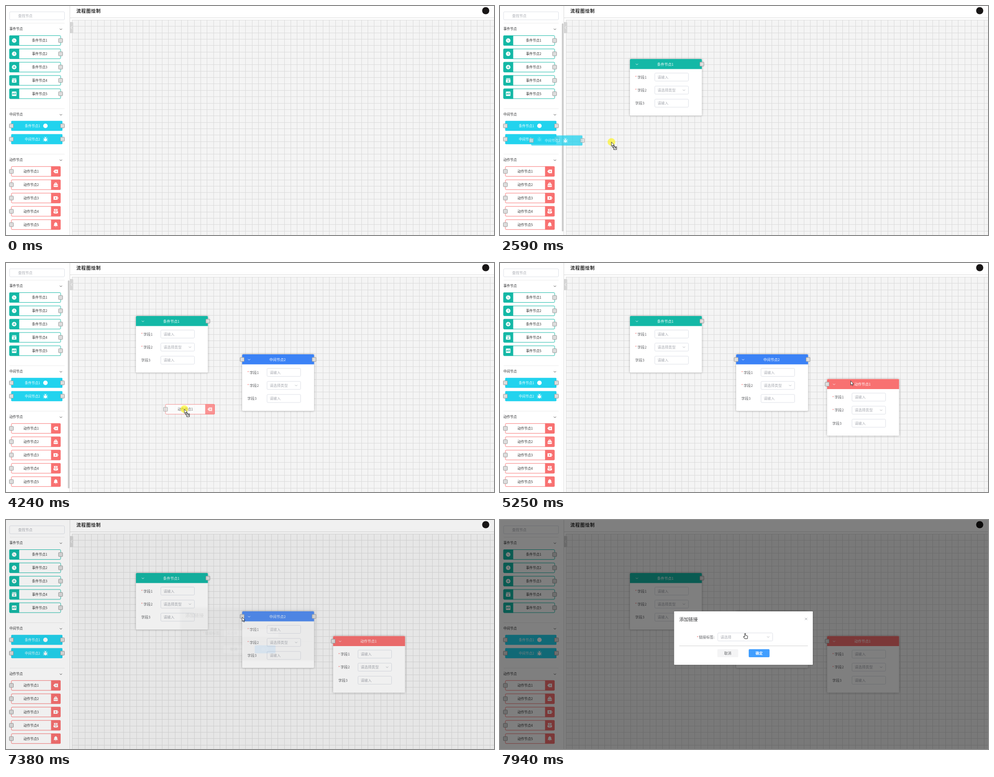
An HTML page with a canvas for the animation above (8000 ms loop, 1089x514 px).

```html
<!DOCTYPE html>
<html lang="zh">
<head>
<meta charset="utf-8">
<style>
html, body { margin: 0; width: 100%; height: 100%; overflow: hidden; background: #fff; }
canvas { display: block; width: 1089px; height: 514px; }
</style>
</head>
<body>
<canvas id="stage"></canvas>
<script>
const W = 1089, H = 514, LOOP = 8000;
const canvas = document.getElementById('stage');
const ctx = canvas.getContext('2d');
const dpr = window.devicePixelRatio || 1;
canvas.width = W * dpr;
canvas.height = H * dpr;

const TEAL = '#14b8a6', CYAN = '#22d3ee', BLUE = '#3b82f6', RED = '#f87171';
const FONT = '"Noto Sans CJK SC", "Noto Sans CJK", sans-serif';
const PITCH = 29.85;

// ---- drawing helpers ----
function text(s, x, y, size, color, align = 'left', weight = 400) {
  ctx.font = `${weight} ${size}px ${FONT}`;
  ctx.textAlign = align;
  ctx.textBaseline = 'middle';
  ctx.fillStyle = color;
  ctx.fillText(s, x, y);
}

function box(x, y, w, h, fill, stroke, radius = 0) {
  ctx.beginPath();
  ctx.roundRect(x, y, w, h, radius);
  if (fill) { ctx.fillStyle = fill; ctx.fill(); }
  if (stroke) { ctx.strokeStyle = stroke; ctx.lineWidth = 1; ctx.stroke(); }
}

function shape(d, x, y, fill, stroke, width = 1) {
  const path = new Path2D(d);
  ctx.save();
  ctx.translate(x, y);
  if (fill) { ctx.fillStyle = fill; ctx.fill(path); }
  if (stroke) { ctx.strokeStyle = stroke; ctx.lineWidth = width; ctx.stroke(path); }
  ctx.restore();
}

function disc(x, y, r, color) {
  ctx.beginPath();
  ctx.arc(x, y, r, 0, 7);
  ctx.fillStyle = color;
  ctx.fill();
}

function shadowed(color, blur, draw) {
  ctx.save();
  ctx.shadowColor = color;
  ctx.shadowBlur = blur * dpr;
  draw();
  ctx.restore();
}

const chevron = (x, y, color) => shape('M-2.5-1.2L0 1.3L2.5-1.2', x, y, null, color, 0.9);
const port = (x, y) => box(x - 4.5, y - 4.5, 9, 9, '#ddd', '#999', 1);

// ---- icons: [white body, mark in the node colour, white strokes] ----
const ROUND = 'M5 0A5 5 0 1 1-5 0A5 5 0 1 1 5 0Z';
const EVENT_ICONS = [
  [ROUND, 'M-2-2L2 2'],
  [ROUND, 'M0-3V0L2 2'],
  [ROUND, 'M-3 0H3M0-3V3'],
  ['M-4.5-5H4.5V-3.5H-4.5ZM-5-2.5H5V4Q5 5 4 5H-4Q-5 5-5 4Z', 'M0-1V3M-2 1L0 3L2 1'],
  ['M-4-5H4Q5-5 5-4V4Q5 5 4 5H-4Q-5 5-5 4V-4Q-5-5-4-5Z',
   'M-3.7 2L-2.2-2L-.7 2M-3.2 .8H-1.2M1 2V-2H2.3Q3.3-2 3.3-1T2.3 0H1M2 0L3.4 2'],
];
const MID_ICONS = [
  [ROUND],
  ['M-3-1H3V2Q3 5 0 5T-3 2ZM-2-1.6Q-2-4 0-4T2-1.6Z', '',
   'M-5-3L-3 0M5-3L3 0M-5.5 1.5H5.5M-5 5L-3 3M5 5L3 3M-2-5.5L-1-3.5M2-5.5L1-3.5'],
];
const ACTION_ICONS = [
  ['M-2-4H5V4H-2L-5.5 0Z', 'M-.5-1.5L2.5 1.5M2.5-1.5L-.5 1.5'],
  ['M-3-2Q-3-5 0-5T3-2Q5-1 5 1H-5Q-5-1-3-2ZM-5 2H5V3Q5 5 3 5H-3Q-5 5-5 3Z', 'M-1.5-2.5H1.5'],
  ['M-5-4H4V4H-5ZM4.7-1.5H6V1.5H4.7Z', 'M-.5-2V2M-2.5 0H1.5'],
  ['M-4-5H4V-1H-4ZM-5 0H5V4H3.5V5H-3.5V4H-5Z', 'M-2-3H2M-2 2H2'],
  ['M0-5.5Q4-4 3.5 0Q3.5 2 5 3H-5Q-3.5 2-3.5 0Q-4-4 0-5.5ZM-1.5 4H1.5Q0 6-1.5 4Z'],
];

function icon([body, mark, strokes], x, y, color) {
  shape(body, x, y, '#fff');
  if (mark) shape(mark, x, y, null, color);
  if (strokes) shape(strokes, x, y, null, '#fff', 0.9);
}

// ---- palette nodes ----
function eventNode(i) {
  const y = 77.5 + i * PITCH;
  box(8, y - 11, 114, 22, '#fff', TEAL, 2);
  box(7.5, y - 11.5, 22, 23, TEAL, null, [2, 0, 0, 2]);
  icon(EVENT_ICONS[i], 18.3, y, TEAL);
  text((i % 2 || i === 4 ? '事件节点' : '条件节点') + (i + 1), 75, y, 7.5, '#333', 'center');
  port(121.8, y);
}

function midNode(i) {
  const y = 269 + i * PITCH;
  box(11.5, y - 11.3, 114.5, 22.6, CYAN, null, 2);
  text(['条件节点1', '中间节点2'][i], 59, y, 7.5, '#fff', 'center');
  icon(MID_ICONS[i], 88, y, CYAN);
  port(12, y);
  port(126, y);
}

function actionNode(i) {
  const y = 371.3 + i * PITCH;
  box(12, y - 11, 109.5, 22, '#fff', RED, 2);
  box(100.5, y - 11.5, 21.5, 23, RED, null, [0, 2, 2, 0]);
  icon(ACTION_ICONS[i], 111, y, RED);
  text('动作节点' + (i + 1), 56, y, 7.5, '#333', 'center');
  port(12, y);
}

function sidebar(t) {
  box(8, 13, 122.5, 18, '#fff', '#dcdfe6', 2);
  text('查找节点', 27, 22, 8, '#a8abb2');
  [38, 230, 332].forEach(y => box(8, y, 123, 1, '#ececec'));
  [['事件节点', 51.5], ['中间节点', 243.5], ['动作节点', 345.5]].forEach(([label, y]) => {
    text(label, 7.5, y, 7.5, '#303133');
    chevron(122.5, y + 0.5, '#333');
  });
  for (let i = 0; i < 5; i++) { eventNode(i); actionNode(i); }
  midNode(0);
  midNode(1);
  box(142, 0, 1, H, '#d8d8d8');
  const alpha = Math.max(window_(t, 720, 1850), window_(t, 2200, 3150), window_(t, 3620, 5200));
  if (alpha) box(138, 39, 3.5, 467, `rgba(150,150,150,${0.5 * alpha})`, null, 2);
}

// ---- main area ----
function workspace() {
  text('流程图绘制', 157, 11.5, 10, '#222', 'left', 700).letterSpacing;
}

function title() {
  ctx.letterSpacing = '1px';
  text('流程图绘制', 157, 11.5, 10, '#222', 'left', 700);
  ctx.letterSpacing = '0px';
}

function grid() {
  const x0 = 147, y0 = 31, step = 14.35;
  box(143, 26, W, 1, '#d8d8d8');
  box(x0, y0, W - x0, H - y0, '#f4f4f4');
  for (let x = x0; x < W; x += step) box(Math.round(x), y0, 1, H - y0, '#dadada');
  for (let y = y0; y < H; y += step) box(x0, Math.round(y), W - x0, 1, '#dadada');
  box(143, 36, 7, 25, '#d6d6d6', null, [0, 2, 2, 0]);
  shape('M1.5-3L-1 0L1.5 3', 146, 48.5, null, '#fff');
  disc(1070.5, 10.5, 8, '#191717');
}

function input(x, y, w, placeholder, isSelect) {
  box(x + 0.5, y - 9, w - 1, 18, '#fff', '#dcdfe6', 2);
  text(placeholder, x + 6.5, y, 8.1, '#a8abb2');
  if (isSelect) chevron(x + w - 10.5, y, '#a8abb2');
}

function formNode({ x, y, name, color, left, right }) {
  const w = 160.5;
  shadowed('rgba(0,0,0,.3)', 5, () => box(x, y, w, 127, '#fff', null, 2));
  box(x, y, w, 22.5, color, null, [2, 2, 0, 0]);
  chevron(x + 15.5, y + 11.8, '#fff');
  text(name, x + 79, y + 11.5, 8, '#fff', 'center', 500);
  ['请输入', '请选择类型', '请输入'].forEach((hint, i) => {
    const rowY = y + 40.5 + i * 29.3;
    if (i < 2) text('*', x + 11.5, rowY + 0.5, 8, '#f56c6c');
    text('字段' + (i + 1), x + (i < 2 ? 16.5 : 11.5), rowY, 8.1, '#606266');
    input(x + 55, rowY, 76, hint, i === 1);
  });
  if (left) port(x, y + 11.5);
  if (right) port(x + w, y + 11.5);
}

function dialog(progress) {
  ctx.fillStyle = `rgba(0,0,0,${0.5 * progress})`;
  ctx.fillRect(0, 0, W, H);
  ctx.save();
  ctx.globalAlpha = progress;
  ctx.translate(0, -10 * (1 - progress));
  shadowed('rgba(0,0,0,.3)', 3, () => box(388.5, 205, 309.5, 120, '#fff', null, 1));
  text('添加链接', 400, 223, 10.3, '#303133');
  shape('M-2.5-2.5L2.5 2.5M2.5-2.5L-2.5 2.5', 683, 222, null, '#909399', 0.8);
  text('*', 439, 263.5, 8, '#f56c6c');
  text('链接标签:', 444, 263, 8.1, '#606266');
  input(485.5, 262.5, 123.5, '请选择', true);
  box(400, 282, 287, 1, '#d0d0d0');
  box(485, 290, 46.5, 18, '#f4f4f5', null, 2);
  text('取消', 508.3, 299, 8, '#606266', 'center');
  box(555, 290, 46.5, 18, '#409eff', null, 2);
  text('确定', 578.3, 299, 8, '#fff', 'center', 700);
  ctx.restore();
}

// ---- motion ----
const smooth = u => u * u * (3 - 2 * u);
const linear = u => u;
const easeOut = u => u * (2 - u);
const clamp = u => Math.min(1, Math.max(0, u));
function window_(t, start, end) {
  return clamp((t - start) / 120) * clamp((end - t) / 120);
}

// Pointer stops: time, x, y, easing into the stop.
const PATH = [
  [70, 928, 480], [840, 84, 77], [910, 84, 77], [1510, 369, 132], [1570, 369, 132],
  [1700, 372, 130], [1770, 372, 130], [2380, 77, 298], [2500, 77, 298],
  [2590, 246, 306, linear], [2860, 608, 217, easeOut], [3060, 608, 217],
  [3800, 54, 371], [3900, 54, 371], [4180, 398, 328], [4240, 398, 328],
  [4370, 402, 326], [4510, 402, 326], [4910, 811, 273], [5110, 811, 273],
  [5870, 497, 180], [5940, 497, 180], [6280, 415, 124], [6420, 448, 128],
  [6690, 450, 133], [6760, 456, 146], [7180, 527, 218], [7600, 527, 218], [7850, 547, 254],
];

function pointerAt(t) {
  const next = PATH.findIndex(stop => stop[0] > t);
  if (next < 0) return PATH.at(-1).slice(1, 3);
  if (next === 0) return PATH[0].slice(1, 3);
  const [t0, x0, y0] = PATH[next - 1];
  const [t1, x1, y1, ease = smooth] = PATH[next];
  const u = ease((t - t0) / (t1 - t0));
  return [x0 + (x1 - x0) * u, y0 + (y1 - y0) * u];
}

// Each drag carries a palette node and leaves a form node when it ends.
const DRAGS = [
  { start: 910, end: 1770, ghost: () => eventNode(0),
    node: { x: 290, y: 119, name: '条件节点1', color: TEAL, right: true } },
  { start: 2480, end: 3060, ghost: () => midNode(1),
    node: { x: 527, y: 205, name: '中间节点2', color: BLUE, left: true, right: true } },
  { start: 3900, end: 5110, ghost: () => actionNode(0),
    node: { x: 730, y: 260.5, name: '动作节点1', color: RED, left: true } },
];
const GHOST_LAG = 60;

function drawGhost(drag, t) {
  const [x0, y0] = pointerAt(drag.start);
  const [x, y] = pointerAt(Math.max(drag.start, t - GHOST_LAG));
  ctx.save();
  ctx.globalAlpha = 0.76;
  ctx.translate(Math.round(x - x0), Math.round(y - y0));
  drag.ghost();
  ctx.restore();
}

function pointer(t, dragging) {
  const [x, y] = pointerAt(t);
  const linking = t >= 6760 && t < 7250;
  if (dragging || linking) disc(x, y, 8.5, 'rgba(255,245,0,.58)');
  if ((t >= 6380 && t < 6760) || t >= 7740) {
    shape('M-1 1Q0-.5 1 1V5L4.5 5.8Q6 6 5.7 8L5 12.5H-1L-4 8Q-3.5 6.5-1 8.5Z', x, y, '#fff', '#111', 0.9);
    return;
  }
  shape('M0 0V9.5L2.2 7.5L3.8 11L5.2 10.3L3.7 7H6.6Z', x, y, '#fff', '#111', 0.8);
  if (dragging) {
    box(x + 2.5, y + 8.5, 4, 4, '#fff', '#222');
    box(x + 5, y + 10.5, 6.5, 6.5, '#fff', '#222');
    shape('M-1.5 1.5L1.5-1.5M-1-1.5H1.5V1', x + 8.2, y + 13.7, null, '#222', 0.9);
  }
}

function draw(t) {
  ctx.setTransform(dpr, 0, 0, dpr, 0, 0);
  ctx.fillStyle = '#fff';
  ctx.fillRect(0, 0, W, H);
  title();
  grid();
  sidebar(t);
  DRAGS.filter(d => t >= d.end).forEach(d => formNode(d.node));
  const drag = DRAGS.find(d => t >= d.start && t < d.end);
  if (drag) drawGhost(drag, t);
  const progress = smooth(clamp((t - 7330) / 240));
  if (progress) dialog(progress);
  if (t >= 70) pointer(t, !!drag);
}

const startTime = performance.now();
function tick() {
  draw((performance.now() - startTime) % LOOP);
  requestAnimationFrame(tick);
}
tick();
</script>
</body>
</html>
```
